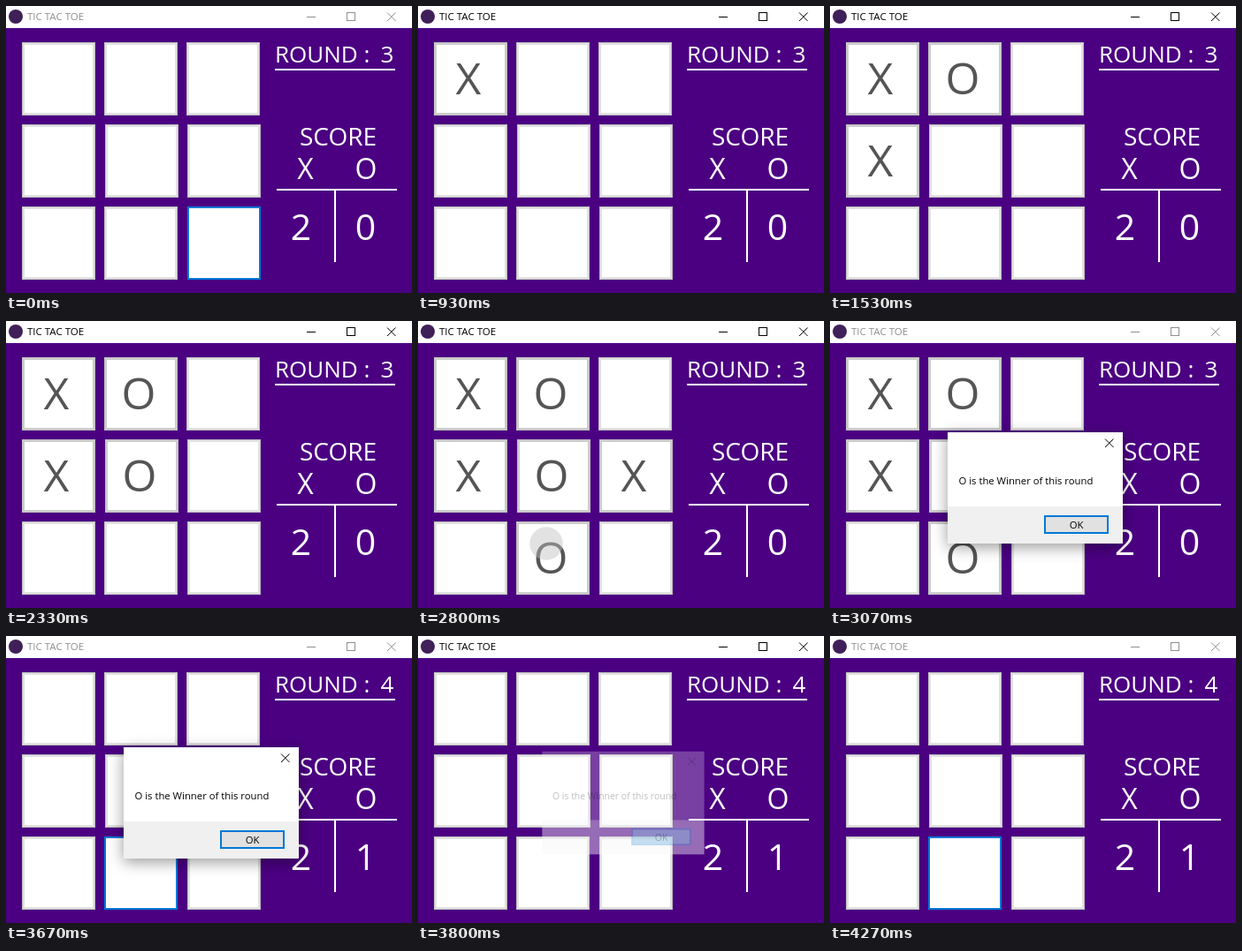
Animation of 459x325 px, one loop 4.34 s. Source, as an HTML page with a canvas:

```html
<!DOCTYPE html>
<html lang="en">
<head>
<meta charset="utf-8">
<title>Tic Tac Toe</title>
<style>
  html, body { margin: 0; height: 100%; overflow: hidden; }
  canvas { display: block; }
</style>
</head>
<body>
<canvas id="stage" width="459" height="325"></canvas>
<script>
const ctx = document.getElementById('stage').getContext('2d');
const LOOP = 4340, RESET = 3670, CELL = 83;
const OPEN = 2850, CLOSE = 3720;
const BLUE = '#0078d7', FONT = '"Open Sans", "Noto Sans", sans-serif';

// Top left corners of the nine buttons
const cells = [
  [18, 41], [111, 41], [204, 41],
  [18, 134], [112, 134], [205, 134],
  [18, 227], [111, 227], [205, 227]
];

// tap: centre of the touch ripple, if one shows
const moves = [
  { at: 730, cell: 0, mark: 'X', tap: [57, 92] },
  { at: 1065, cell: 1, mark: 'O', tap: [150, 103] },
  { at: 1525, cell: 3, mark: 'X' },
  { at: 1995, cell: 4, mark: 'O', tap: [150, 193] },
  { at: 2395, cell: 5, mark: 'X', tap: [266, 190] },
  { at: 2795, cell: 7, mark: 'O', tap: [145, 252] }
];

const progress = (t, from, length) => Math.min(1, Math.max(0, (t - from) / length));
const easeOut = p => 1 - (1 - p) ** 3;

function rect(x, y, w, h, color) {
  ctx.fillStyle = color;
  ctx.fillRect(x, y, w, h);
}

function text(str, x, y, size, color = '#fff', align = 'center') {
  ctx.font = `${size}px ${FONT}`;
  ctx.textAlign = align;
  ctx.fillStyle = color;
  ctx.fillText(str, x, y);
}

function circle(x, y, r, color) {
  ctx.fillStyle = color;
  ctx.beginPath();
  ctx.arc(x, y, r, 0, 2 * Math.PI);
  ctx.fill();
}

function cross(x, y, size, color) {
  ctx.strokeStyle = color;
  ctx.lineWidth = 1;
  ctx.beginPath();
  ctx.moveTo(x, y);
  ctx.lineTo(x + size, y + size);
  ctx.moveTo(x + size, y);
  ctx.lineTo(x, y + size);
  ctx.stroke();
}

function titleBar(active) {
  const color = active ? '#000' : '#8f8f8f';
  rect(0, 0, 459, 25, '#fff');
  circle(11, 12, 8, '#3f2058');
  text('TIC TAC TOE', 24, 16, 11.5, color, 'left');
  rect(340, 12, 10, 1, color);
  ctx.strokeStyle = color;
  ctx.lineWidth = 1;
  ctx.strokeRect(385.5, 7.5, 9, 9);
  cross(431, 7.5, 9.5, color);
}

function scoreBoard(finished) {
  text('ROUND', 304, 64, 26, '#fff', 'left');
  text(':', 408, 64, 26);
  text(finished ? '4' : '3', 431, 64, 26);
  rect(304, 71, 136, 2, '#fff');
  text('SCORE', 375.5, 158, 28);
  text('X', 338.5, 196, 32);
  text('O', 407, 196, 32);
  rect(306, 207, 136, 2, '#fff');
  rect(371, 208, 2, 82, '#fff');
  text('2', 333.5, 265, 41);
  text(finished ? '1' : '0', 406.5, 265, 41);
}

function button([x, y], mark, focused) {
  const [edge, face] = mark ? ['#bfbfbf', '#cccccc'] : ['#bdbdbd', '#e1e1e1'];
  rect(x, y, CELL, CELL, focused ? BLUE : edge);
  const border = focused ? 2 : 1;
  rect(x + border, y + border, CELL - 2 * border, CELL - 2 * border, face);
  const inset = focused ? 2 : 3;
  rect(x + inset, y + inset, CELL - 2 * inset, CELL - 2 * inset, '#fff');
  if (mark) text(mark, x + 39, y + 59, 50, '#555');
}

function ripple({ at, tap }, t) {
  if (!tap || t < at || t > at + 200) return;
  const p = (t - at) / 200;
  circle(...tap, 18 + 8 * easeOut(p), `rgba(190,190,190,${0.45 * (1 - p * p)})`);
}

function dialog(t) {
  const alpha = easeOut(progress(t, OPEN, 200)) * (1 - easeOut(progress(t, CLOSE, 220)));
  if (alpha <= 0) return;
  const scale = 0.9 + 0.1 * alpha;
  ctx.save();
  ctx.globalAlpha = alpha;
  ctx.translate(232, 189);
  ctx.scale(scale, scale);
  ctx.translate(-232, -189);
  if (alpha === 1) {
    ctx.shadowColor = 'rgba(0,0,0,.4)';
    ctx.shadowBlur = 16;
    ctx.shadowOffsetY = 4;
  }
  rect(133, 126, 198, 126, '#fff');
  ctx.shadowColor = 'transparent';
  rect(133, 210, 198, 42, '#f0f0f0');
  cross(311, 133.5, 9.5, '#000');
  text('O is the Winner of this round', 145.5, 185, 11.3, '#000', 'left');
  rect(242, 220, 73, 21, BLUE);
  rect(244, 222, 69, 17, '#e1e1e1');
  text('OK', 278.5, 235, 11.3, '#000');
  ctx.restore();
}

function draw() {
  const t = performance.now() % LOOP;
  const finished = t >= RESET;
  const active = (t >= 600 && t < OPEN) || (t >= CLOSE && t < 4265);
  const focus = finished ? 7 : t < 600 ? 8 : -1;
  const played = finished ? [] : moves.filter(m => t >= m.at);

  rect(0, 0, 459, 325, '#4b0082');
  titleBar(active);
  scoreBoard(finished);
  cells.forEach((pos, i) => {
    const move = played.find(m => m.cell === i);
    button(pos, move && move.mark, !active && i === focus);
  });
  played.forEach(m => ripple(m, t));
  dialog(t);
  requestAnimationFrame(draw);
}
draw();
</script>
</body>
</html>
```
